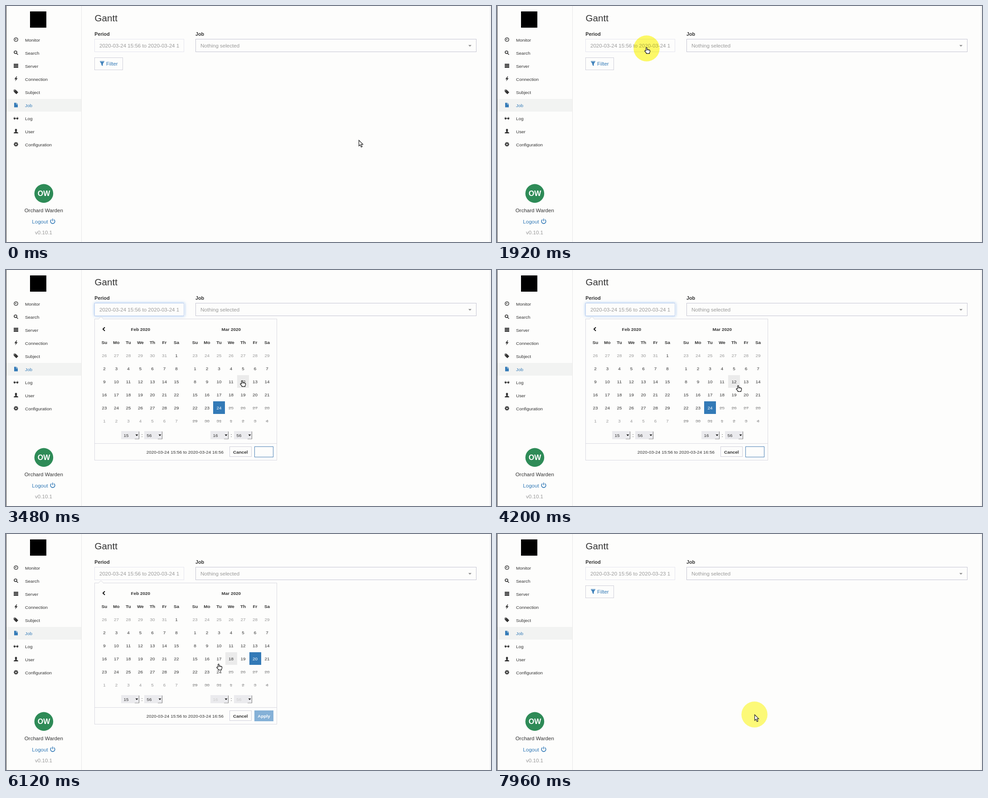
These frames come from a looping animation (1070x523 px, 8 s). An HTML page with a canvas:

```html
<!DOCTYPE html>
<html lang="en">
<head>
<meta charset="utf-8">
<title>Gantt</title>
<style>
html, body { margin: 0; width: 100%; height: 100%; overflow: hidden; background: #fdfdfc; }
canvas { display: block; }
</style>
</head>
<body>
<canvas id="stage" width="1070" height="523"></canvas>
<script>
const ctx = document.getElementById('stage').getContext('2d');
const LOOP = 8000, HOVER_LAG = 120, GLOW = 560, GLOW_FADE = 280;
const BG = '#fdfdfc', INK = '#333', BLUE = '#337ab7', GREY = '#999';
const LINE = '#d9d9e1';
const SMALL = 9.92, NORMAL = 11.57;

// Moments of the story
const OPEN = 2080, PICK_START = 4760, PICK_END = 6600, CLOSE = 7760;
const CLICKS = [1840, PICK_START, PICK_END, 7640];
const PATH = [
  [0, 778, 297], [580, 778, 297], [1720, 330, 94], [2400, 330, 94],
  [3340, 521, 247], [3900, 521, 247], [4600, 550, 275], [5600, 550, 275],
  [5960, 497, 282], [6120, 469, 290], [6460, 446, 304], [7000, 446, 304],
  [7500, 568, 400], [LOOP, 568, 400]
];

function pointer(t) {
  t = Math.max(0, t);
  let i = 1;
  while (i < PATH.length - 1 && t > PATH[i][0]) i++;
  const [t0, x0, y0] = PATH[i - 1], [t1, x1, y1] = PATH[i];
  const u = (t - t0) / (t1 - t0), s = u * u * (3 - 2 * u);
  return { x: x0 + (x1 - x0) * s, y: y0 + (y1 - y0) * s };
}

// Drawing helpers
function text(str, x, y, { size = SMALL, color = INK, bold = false, align = 'left' } = {}) {
  ctx.font = `${bold ? 'bold ' : ''}${size}px "Liberation Sans", Arial, sans-serif`;
  ctx.textAlign = align;
  ctx.fillStyle = color;
  ctx.fillText(str, x, y);
}
function box(x, y, w, h, fill, border) {
  if (fill) { ctx.fillStyle = fill; ctx.fillRect(x, y, w, h); }
  if (border) {
    ctx.lineWidth = 1;
    ctx.strokeStyle = border;
    ctx.strokeRect(x + .5, y + .5, w - 1, h - 1);
  }
}
function disc(x, y, r, fill) {
  ctx.fillStyle = fill;
  ctx.beginPath();
  ctx.arc(x, y, r, 0, 7);
  ctx.fill();
}
function shape(d, x, y, { fill, stroke, width = 1 }) {
  const p = new Path2D(d);
  ctx.save();
  ctx.translate(x, y);
  if (fill) { ctx.fillStyle = fill; ctx.fill(p); }
  if (stroke) { ctx.strokeStyle = stroke; ctx.lineWidth = width; ctx.stroke(p); }
  ctx.restore();
}
const inside = (p, x, y, w, h) => p.x >= x && p.x < x + w && p.y >= y && p.y < y + h;

// Menu: label, icon path around (0,0), stroke width (0 means filled)
const MENU = [
  ['Monitor', 'M4.2 0A4.2 4.2 0 1 1 -4.2 0A4.2 4.2 0 1 1 4.2 0M0 .8L-1.8 -2M-2.5 1h.8M1.8 1h.8M1 -2h.8', 1.3],
  ['Search', 'M2 -1A3 3 0 1 1 -4 -1A3 3 0 1 1 2 -1M1.3 1.5L4.5 4.5', 1.7],
  ['Server', 'M-5 -4.5h10v2.5h-10zM-5 -1.2h10v2.5h-10zM-5 2.1h10v2.5h-10z', 0],
  ['Connection', 'M1 -5.5L-3.5 .8H-.4L-1.8 5.5L3.6 -1.6H.4L2.4 -5.5z', 0],
  ['Subject', 'M-5 -5H-.8L5 .8L.8 5L-5 -.8zM-3.6 -2.8a.8 .8 0 1 0 1.6 0a.8 .8 0 1 0 -1.6 0', 0],
  ['Job', 'M-4 -5H.4V-1.2H4V5H-4zM1.3 -5L4 -2.1H1.3z', 0],
  ['Log', 'M-5.2 -.2L-3.6 -2.6H-2V-1.8H-3.2L-4 -.4H4L3.2 -1.8H2V-2.6H3.6L5.2 -.2V1A2.2 2 0 0 1 .8 1V.5H-.8V1A2.2 2 0 0 1 -5.2 1z', 0],
  ['User', 'M-2.3 -2.4A2.3 2.8 0 1 1 2.3 -2.4Q2.1 0 1.1 1L4.8 3V4.7H-4.8V3L-1.1 1Q-2.1 0 -2.3 -2.4z', 0],
  ['Configuration', 'M2.6 0A2.6 2.6 0 1 1 -2.6 0A2.6 2.6 0 1 1 2.6 0M0 -5V-3M0 3V5M-5 0H-3M3 0H5M-3.5 -3.5L-2.2 -2.2M2.2 2.2L3.5 3.5M-3.5 3.5L-2.2 2.2M2.2 -2.2L3.5 -3.5', 2]
];

function sidebar() {
  box(0, 0, 1, 523, '#444');
  box(166, 0, 1, 523, '#e8e8e8');
  box(1067, 0, 3, 523, '#f3f3f3');
  box(1, 206, 165, 28, '#f2f3f2');
  box(53, 12, 36, 36, '#000');
  MENU.forEach(([label, icon, width], i) => {
    const y = 75 + 29 * i, color = label === 'Job' ? BLUE : INK;
    shape(icon, 22, y - .5, width ? { stroke: color, width } : { fill: color });
    text(label, 42, y + 4, { color });
  });
  disc(83.4, 415.4, 20.8, '#2e8b57');
  text('OW', 83.5, 421, { size: 16, color: '#fff', bold: true, align: 'center' });
  text('Orchard Warden', 83.3, 457, { size: NORMAL, align: 'center' });
  text('Logout', 57.3, 482, { size: NORMAL, color: BLUE });
  shape('M-2.8 -3.9A4.8 4.8 0 1 0 2.8 -3.9M0 -6V-.5', 103, 477.3, { stroke: BLUE, width: 1.6 });
  text('v0.10.1', 83, 506, { size: NORMAL, color: GREY, align: 'center' });
}

const period = (from, to) => `2020-03-${from} 15:56 to 2020-03-${to} 16:56`;

function form(s) {
  text('Gantt', 195.5, 34, { size: 20.6 });
  text('Period', 195.3, 66, { size: 10.74, bold: true });
  text('Job', 418, 66, { size: 10.74, bold: true });
  if (s.focused) {
    ctx.save();
    ctx.shadowColor = 'rgba(102,160,233,.6)';
    ctx.shadowBlur = 6;
    box(195, 73, 199, 29, BG);
    ctx.restore();
  }
  box(195, 73, 198, 29, BG, s.focused ? '#bccff0' : '#e4e4ee');
  const value = s.t < CLOSE ? period(24, 24) : period(20, 23);
  text(value.slice(0, -4), 206, 92, { size: NORMAL, color: GREY });
  box(418, 73, 620, 29, BG, '#c4c4d2');
  text('Nothing selected', 429, 92, { size: NORMAL, color: GREY });
  shape('M-3.5 -1.5H3.5L0 2z', 1023.5, 88, { fill: '#888' });
  box(195, 114, 63, 28, BG, '#cfcfda');
  shape('M-5 -5.5H5V-4.2H-5zM-4.6 -3.4H4.6L1.5 .4V5.5L-1.5 3.6V.4z', 212, 127.5, { fill: BLUE });
  text('Filter', 221, 132, { size: NORMAL, color: BLUE });
}

// Calendars
const DAYS = ['Su', 'Mo', 'Tu', 'We', 'Th', 'Fr', 'Sa'];
const MONTHS = [
  { name: 'Feb 2020', x: 217, lead: 5, before: 31, length: 29, last: 99 },
  { name: 'Mar 2020', x: 417, lead: 6, before: 29, length: 31, last: 24 }
];
const STEP = 26.5, ROW = 29;

function cellAt(p) {
  for (const m of MONTHS) {
    if (!inside(p, m.x - 13, 174.5, 7 * STEP, 6 * ROW)) continue;
    const col = Math.floor((p.x - m.x + 13) / STEP), row = Math.floor((p.y - 174.5) / ROW);
    const day = 7 * row + col - m.lead;
    if (day <= m.last) return { m, day };
  }
}

function month(m, s) {
  const isMarch = m === MONTHS[1];
  text(m.name, m.x + 79.8, 134.5, { bold: true, align: 'center' });
  DAYS.forEach((d, c) => text(d, m.x + c * STEP, 163.5, { bold: true, align: 'center' }));
  const over = s.hover && s.hover.m === m ? s.hover.day : null;
  const rangeEnd = s.end || (isMarch && over) || 0;
  for (let i = 0; i < 42; i++) {
    const day = i - m.lead, x = m.x + i % 7 * STEP, y = 189 + Math.floor(i / 7) * ROW;
    const off = day < 1 || day > m.length, disabled = day > m.last;
    const active = isMarch && (day === s.start || day === s.end);
    const inRange = isMarch && day > s.start && day < rangeEnd;
    const fill = active ? BLUE : day === over ? '#ebebeb' : inRange ? '#ebf3f4' : null;
    if (fill) box(Math.round(x - 13), y - 14, 26, 28, fill);
    const label = String(day < 1 ? day + m.before : day > m.length ? day - m.length : day);
    text(label, x, y + 3.5, { color: active ? '#fff' : off || disabled ? GREY : INK, align: 'center' });
    if (disabled) {
      const w = label.length * 5.5;
      box(x - w / 2, y, w, 1, GREY);
    }
  }
}

function select(x, value, disabled) {
  box(x, 357, 40, 18, '#ebebee');
  text(value, x + 5.5, 369.5, { color: disabled ? '#ccc' : INK });
  shape('M-3 -1.5H3L0 2z', x + 34.5, 366, { fill: '#111' });
  box(x + 39, 358, 1, 16, '#777');
  box(x + 30, 374, 10, 1, '#999');
}

function picker(s) {
  box(195, 108, 403, 314, BG, LINE);
  shape('M-6 .5L0 -5L6 .5', 209.5, 108.5, { fill: BG, stroke: LINE });
  shape('M2 -4L-2 0L2 4', 216, 131, { stroke: '#111', width: 2 });
  MONTHS.forEach(m => month(m, s));
  select(254, '15');
  select(305, '56');
  select(451, '16', s.picking);
  select(503, '56', s.picking);
  text(':', 300, 369.5, { align: 'center', size: NORMAL });
  text(':', 497, 369.5, { align: 'center', size: NORMAL });
  box(196, 384, 401, 1, LINE);
  text(s.t < PICK_END ? period(24, 24) : period(20, 23), 309.7, 406.5);
  box(493, 391, 49, 23, BG, '#cfcfda');
  text('Cancel', 517.3, 406.5, { bold: true, align: 'center' });
  if (s.picking) {
    box(548, 391, 42, 24, '#85b1d7');
    text('Apply', 569, 406.5, { bold: true, color: '#fff', align: 'center' });
  } else {
    box(548, 391, 42, 24, BG, '#4a80b5');
  }
}

// Pointer
const ARROW = 'M.5 .5V13.2L3.4 10.5L5.6 15.6L7.9 14.6L5.7 9.7H9.5z';
const HAND = 'M-1.3 6V.4Q-1.2 -.9 0 -.9Q1.2 -.9 1.2 .4V3.6Q2.5 2.9 3.4 4Q4.7 3.3 5.5 4.5Q7.5 4.2 7.5 6V8.5Q7.2 10 6.4 10.5V12.3H-.6V11L-4 7.2Q-4.4 5.6 -2.9 5.6z';

function highlight(t, p) {
  const click = CLICKS.find(c => t >= c && t < c + GLOW);
  if (click === undefined) return;
  const strength = Math.min(1, (click + GLOW - t) / GLOW_FADE);
  ctx.save();
  ctx.globalCompositeOperation = 'multiply';
  ctx.globalAlpha = strength;
  disc(p.x, p.y, 28.7, '#fdf884');
  ctx.globalCompositeOperation = 'source-over';
  ctx.globalAlpha = strength * .22;
  disc(p.x, p.y, 28.7, '#ff0');
  ctx.restore();
}

function drawPointer(p, open) {
  const clickable = inside(p, 195, 73, 198, 29) || inside(p, 418, 73, 620, 29) ||
    open && (cellAt(p) || inside(p, 493, 391, 97, 24));
  const x = Math.round(p.x), y = Math.round(p.y);
  if (clickable) {
    shape(HAND, x, y - 1, { fill: '#fff', stroke: '#111', width: 1.2 });
    shape('M1.2 4V5.6M3.4 4.2V5.6M5.5 4.6V5.8', x, y - 1, { stroke: '#111', width: .7 });
  } else {
    shape(ARROW, x, y, { fill: '#fff', stroke: '#222', width: 1.2 });
  }
}

function draw(t) {
  const p = pointer(t);
  const picking = t >= PICK_START && t < PICK_END;
  const s = {
    t, picking,
    focused: t >= OPEN && t < PICK_START,
    start: t < PICK_START ? 24 : 20,
    end: t < PICK_START ? 24 : picking ? null : 23,
    hover: cellAt(pointer(t - HOVER_LAG))
  };
  const open = t >= OPEN && t < CLOSE;
  box(0, 0, 1070, 523, BG);
  sidebar();
  form(s);
  if (open) picker(s);
  highlight(t, p);
  drawPointer(p, open);
}

function tick() {
  draw(performance.now() % LOOP);
  requestAnimationFrame(tick);
}
tick();
</script>
</body>
</html>
```
